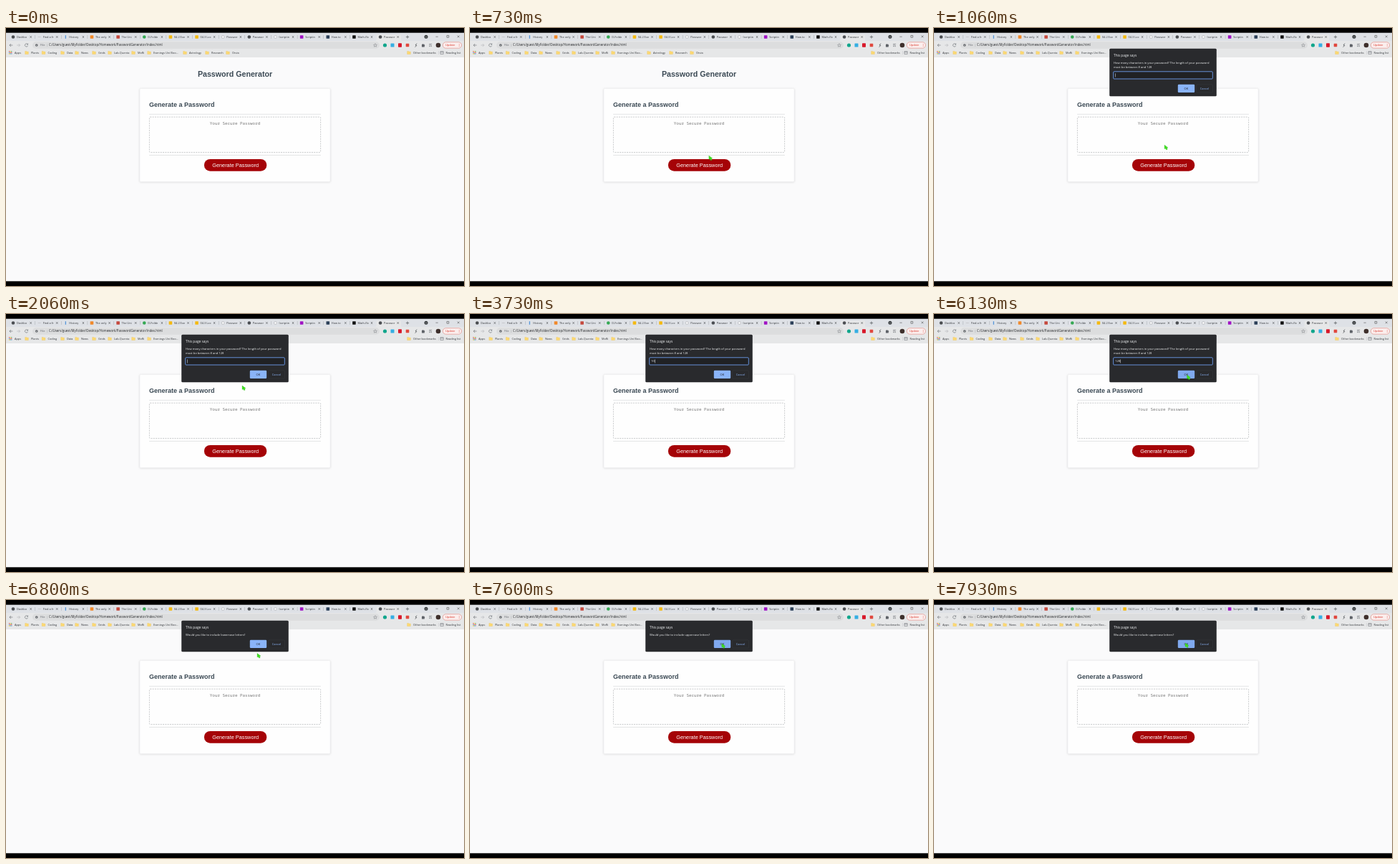
These frames come from a looping animation (640x360 px, 8 s). An HTML page:

```html
<!DOCTYPE html>
<html lang="en">
<head>
<meta charset="utf-8">
<title>Password Generator</title>
<style>
  html, body { margin: 0; width: 100%; height: 100%; overflow: hidden; background: #000; }
  svg { display: block; width: 640px; height: 360px; }
  text { font-family: "Open Sans", "Noto Sans", sans-serif; white-space: pre; }
  .page text { font-family: "Liberation Sans", Arial, sans-serif; }
  .page .mono { font-family: "Noto Sans Mono", "DejaVu Sans Mono", monospace; }
</style>
</head>
<body>
<svg id="stage" viewBox="0 0 640 360" xmlns="http://www.w3.org/2000/svg"></svg>
<script>
const LOOP = 8000;
const TOP = 6.67, BOTTOM = 353.33;
const BAR = "#e6e7e8";

// Markup helpers
const attrs = o => Object.entries(o).map(([k, v]) => ` ${k}="${v}"`).join("");
const rect = (x, y, w, h, fill, o = {}) =>
  `<rect${attrs({ x, y, width: w, height: h, fill, ...o })}/>`;
const circle = (cx, cy, r, fill, o = {}) => `<circle${attrs({ cx, cy, r, fill, ...o })}/>`;
const path = (d, stroke, width = 0.6, o = {}) =>
  `<path${attrs({ d, stroke, "stroke-width": width, fill: "none", ...o })}/>`;
const label = (x, y, size, fill, str, o = {}) =>
  `<text${attrs({ x, y, "font-size": size, fill, ...o })}>${str}</text>`;
const MID = { "text-anchor": "middle" };
const BOLD = { "font-weight": 700 };

const TABS = [
  ["Dashbo", "#4a4d51", "dot"], ["Find a fr", "#c4c6ca", "bar"], ["History", "#4a90d9", "post"],
  ["The only", "#f0892a", "box"], ["The Uni", "#c5483c", "box"], ["D-Folde", "#35a853", "dot"],
  ["04.2 Exe", "#f4b911", "box"], ["04.3 Loc", "#f4b911", "box"], ["Passwor", "#a9acb0", "ring"],
  ["Passwor", "#4a4d51", "dot"], ["(scriptin", "#a9acb0", "ring"], ["Scriptin", "#a012c4", "box"],
  ["How to", "#2b3f58", "box"], ["Math-flo", "#111111", "box"], ["Passwor", "#4a4d51", "dot"]
];

const BOOKMARKS = [
  [29, "Plants"], [52.5, "Coding"], [79, "Data"], [99, "News"], [123, "Grids"],
  [145, "Lab-Quenta"], [178, "MoRi"], [200, "Evenings Uni Boo…"], [250, "Astrology"],
  [281, "Research"], [310, "Orvia"], [563, "Other bookmarks"]
];

function tabIcon(kind, x, color) {
  if (kind === "dot") return circle(x, 12.5, 2.3, color);
  if (kind === "ring") return circle(x, 12.5, 2, "#f4f5f6", { stroke: color, "stroke-width": 0.6 });
  if (kind === "bar") return rect(x - 2, 12, 4, 0.9, color);
  if (kind === "post") return rect(x - 0.6, 10.2, 1.2, 4.6, color);
  return rect(x - 2.3, 10.3, 4.6, 4.4, color, { rx: 0.4 });
}

function tabStrip() {
  const pitch = 36.65;
  let out = rect(0, TOP, 640, 18 - TOP, "#dee1e6");
  TABS.forEach(([name, color, kind], i) => {
    const x = 10 + i * pitch;
    const active = i === TABS.length - 1;
    if (active) out += path(`M${x - 7} 18q1.5 0 1.5-1.5v-5.5q0-1.7 1.7-1.7h31q1.7 0 1.7 1.7v5.5q0 1.5 1.5 1.5z`,
      "none", 0, { fill: BAR });
    else if (i < TABS.length - 2) out += rect(x + 30.4, 10, 0.4, 5, "#9a9ea4");
    out += tabIcon(kind, x, color);
    out += label(x + 5, 14, 3.9, "#33363a", name);
    const c = x + 24.6;
    out += path(`M${c - 1.2} 11.3l2.4 2.4m0-2.4l-2.4 2.4`, "#33363a", 0.6);
  });
  out += path("M558.8 12.5h4.4m-2.2-2.2v4.4", "#3c4043", 0.6);
  out += circle(587, 12.3, 2.5, "#3c4043") + path("M586 12l1 1 1-1", "#fff", 0.4);
  out += path("M600.5 12.2h3.2M616 10.4h2.8v2.8h-2.8zM630.8 10.5l2.8 2.8m0-2.8l-2.8 2.8", "#333", 0.5);
  return out;
}

function toolbar() {
  let out = rect(0, 18, 640, 23, BAR);
  out += path("M9.3 24h-4.4m2-2l-2 2 2 2", "#5f6368", 0.6);
  out += path("M15.2 24h4.4m-2-2l2 2-2 2", "#b0b3b7", 0.6);
  out += path("M30.2 22.7a2.1 2.1 0 1 0 .3 2M30.6 21.5v1.6h-1.6", "#5f6368", 0.6);
  out += rect(37, 19.3, 485, 9.4, "#dcddde", { rx: 4.7 });
  out += circle(42.7, 24, 1.8, "#5f6368") + rect(42.4, 23.6, 0.6, 1.4, "#fff");
  out += label(48, 25.4, 4.1, "#5f6368", "File") + rect(57.3, 22, 0.35, 4, "#9aa0a6");
  out += label(60, 25.4, 4.38, "#26282b", "C:/Users/guest/MyFolder/Desktop/Homework/PasswordGenerator/index.html");
  out += path("M516 21.7l.7 1.5 1.7.2-1.2 1.1.3 1.7-1.5-.8-1.5.8.3-1.7-1.2-1.1 1.7-.2z", "#5f6368", 0.4);
  out += circle(529.5, 24, 2.6, "#12a68c");
  out += rect(537.5, 21.6, 5, 4.8, "#35aee2", { rx: 0.5 });
  out += rect(548, 21.3, 5, 5.4, "#d8192b", { rx: 0.8 });
  out += rect(558.7, 21.8, 4.6, 4.4, "#e0483e", { rx: 0.6 });
  out += path("M574 21.5l-2 2.5 2 .2-2.4 2.5", "#55585c", 0.8);
  out += path("M581 22.8h1.2q.3-1.6 1.2 0h1.4v1.3q1.3.4 0 1.2v1.3h-3.8z", "none", 0, { fill: "#5f6368" });
  out += path("M591.2 22.4h4m-4 1.6h2.5m-2.5 1.6h2m1.2-1.6v2.2", "#5f6368", 0.6);
  out += circle(604, 24, 3.3, "#3f302c");
  out += rect(610.4, 19.7, 26.2, 8.5, "#fbeeed", { rx: 4.2, stroke: "#dc7069", "stroke-width": 0.5 });
  out += label(614, 25.4, 3.9, "#d93025", "Update");
  out += [22.4, 24, 25.6].map(y => circle(633.2, y, 0.45, "#d93025")).join("");
  return out;
}

function bookmarks() {
  const dots = ["#ea4335", "#fbbc04", "#34a853", "#4285f4", "#ea4335"];
  let out = "";
  for (let i = 0; i < 9; i++)
    out += rect(4 + (i % 3) * 1.6, 32.2 + Math.floor(i / 3) * 1.6, 1.1, 1.1, dots[i % 5]);
  out += label(12, 36, 3.9, "#33363a", "Apps");
  for (const [x, name] of BOOKMARKS) {
    out += path(`M${x - 2.3} 32.4h1.8l.6.7h2.2v3.4h-4.6z`, "#f0bd3f", 0.3, { fill: "#fbd975" });
    out += label(x + 6, 36, 3.9, "#33363a", name);
  }
  out += rect(604, 32, 0.35, 5, "#b8bbc0");
  out += path("M607 32.6h4.2v3.8h-4.2zm0 1.3h4.2", "#5f6368", 0.5);
  return out + label(614.5, 36, 3.9, "#33363a", "Reading list");
}

function page() {
  const red = "#a50307", ink = "#3b4954";
  return `<g class="page">` +
    rect(0, 41, 640, BOTTOM - 41, "#fafafb") +
    label(320, 67.6, 10.667, ink, "Password Generator", { ...MID, ...BOLD }) +
    rect(186.5, 84.6, 267, 131, "#000", { rx: 2, opacity: 0.11, filter: "url(#soft)" }) +
    rect(187, 84.5, 266, 130, "#fefefe", { rx: 1.6, stroke: "#eaebec", "stroke-width": 0.4 }) +
    label(200, 109.6, 9, ink, "Generate a Password", BOLD) +
    rect(200, 119.9, 240, 0.6, "#d4d6d8") + rect(200, 177.2, 240, 0.6, "#d4d6d8") +
    rect(200.4, 124.2, 239.2, 49.3, "#fefefe", { rx: 1, stroke: "#b4b6b8", "stroke-width": 0.7, "stroke-dasharray": "2 1.3" }) +
    label(320, 135.2, 5.86, "#757575", "Your Secure Password", { ...MID, class: "mono" }) +
    rect(276.9, 182.9, 87.4, 16.9, red, { rx: 8.4 }) +
    label(320.6, 193.6, 7.333, "#fff", "Generate Password", MID) + `</g>`;
}

function dialog(id, height, lines, extra = "") {
  const by = 29 + height - 16.2;
  return `<g id="${id}" visibility="hidden">` +
    rect(245.2, 28.8, 149.6, height + 0.4, "#292a2d", { rx: 1.5 }) +
    label(251, 40.2, 4.8, "#f1f3f4", "This page says") +
    lines.map((s, i) => label(251, 49.6 + i * 6.6, 4.14, "#f1f3f4", s)).join("") + extra +
    rect(340.8, by, 23.4, 11.2, "#8ab4f8", { rx: 1.2, class: "ok" }) +
    label(352.4, by + 7.1, 4.1, "#202124", "OK", MID) +
    rect(366.7, by, 22.8, 11.2, "none", { rx: 1.2, stroke: "#3f4246", "stroke-width": 0.35 }) +
    label(378, by + 7.1, 4.1, "#8ab4f8", "Cancel", MID) + `</g>`;
}

const field =
  rect(250.7, 60.8, 138.6, 10.2, "#202124", { rx: 1, stroke: "#6d9cec", "stroke-width": 0.9 }) +
  label(253, 67.4, 4.2, "#f1f3f4", "", { id: "value" }) +
  rect(253.3, 63.4, 0.5, 5, "#f1f3f4", { id: "caret" });

const stage = document.getElementById("stage");
stage.innerHTML =
  `<defs><filter id="soft" x="-10%" y="-10%" width="120%" height="130%"><feGaussianBlur stdDeviation="1.6"/></filter></defs>` +
  rect(0, 0, 640, 360, "#000") + tabStrip() + toolbar() + bookmarks() + page() +
  dialog("length", 66, ["How many characters in your password? The length of your password", "must be between 8 and 128"], field) +
  dialog("lower", 43, ["Would you like to include lowercase letters?"]) +
  dialog("upper", 43, ["Would you like to include uppercase letters?"]) +
  path("M0 0L.1 5.4 1.4 4.7 2.6 6.6 4.2 6 3.4 4.3 4.9 3.6z", "#2fae22", 0.3, { id: "pointer", fill: "#3fe01f" });

// Timelines: [time, value], each held until the next step
const DIALOG = [[0, ""], [930, "length"], [6330, ""], [6400, "lower"], [7130, ""], [7200, "upper"]];
const VALUE = [[0, ""], [3400, "1"], [3730, "10"], [4000, "1"], [4860, "12"], [4930, "128"]];
const CARET = [[0, 1], [1600, 0], [2060, 1], [2660, 0], [3200, 1], [4530, 0], [4860, 1], [5460, 0], [5990, 1]];
const POINTER_ON = [[0, 0], [460, 1], [3400, 0], [5400, 1]];
// Pointer path: [time, x, y]
const PATH = [
  [460, 424, 62], [600, 372, 128], [730, 334, 178], [800, 321, 189], [930, 321, 189],
  [1060, 322, 163.5], [1260, 329, 121], [1330, 330, 115], [1460, 331, 104], [2000, 331, 104],
  [2060, 330, 100], [2260, 332, 98], [5400, 332, 98], [5730, 342, 94], [6000, 352, 86],
  [6130, 353.5, 85], [6260, 353.5, 84.5], [6660, 353, 84], [6800, 351, 74.5], [7000, 351, 61],
  [7200, 351, 60], [7530, 352, 61], [7930, 351, 60]
];

const held = (steps, t) => steps.filter(s => s[0] <= t).pop()[1];

function pointerAt(t) {
  const i = PATH.findIndex(p => p[0] > t);
  if (i === 0) return PATH[0].slice(1);
  if (i < 0) return PATH[PATH.length - 1].slice(1);
  const [t0, x0, y0] = PATH[i - 1], [t1, x1, y1] = PATH[i];
  const k = (t - t0) / (t1 - t0);
  return [x0 + (x1 - x0) * k, y0 + (y1 - y0) * k];
}

const el = id => document.getElementById(id);
const value = el("value"), caret = el("caret"), pointer = el("pointer");
const dialogs = ["length", "lower", "upper"].map(el);
const show = (node, on) => node.setAttribute("visibility", on ? "visible" : "hidden");

function draw(t) {
  const open = held(DIALOG, t), [x, y] = pointerAt(t), visible = held(POINTER_ON, t);
  for (const d of dialogs) {
    show(d, d.id === open);
    const ok = d.querySelector(".ok"), top = +ok.getAttribute("y");
    const over = visible && x > 341 && x < 364 && y > top && y < top + 11.2;
    ok.setAttribute("fill", over ? "#80a9ee" : "#8ab4f8");
  }
  const typed = held(VALUE, t);
  value.textContent = typed;
  caret.setAttribute("x", 253.3 + typed.length * 2.4);
  show(caret, open === "length" && held(CARET, t));
  show(pointer, visible);
  pointer.setAttribute("transform", `translate(${x.toFixed(2)} ${y.toFixed(2)})`);
}

const start = performance.now();
function tick() {
  draw((performance.now() - start) % LOOP);
  requestAnimationFrame(tick);
}
tick();
</script>
</body>
</html>
```
